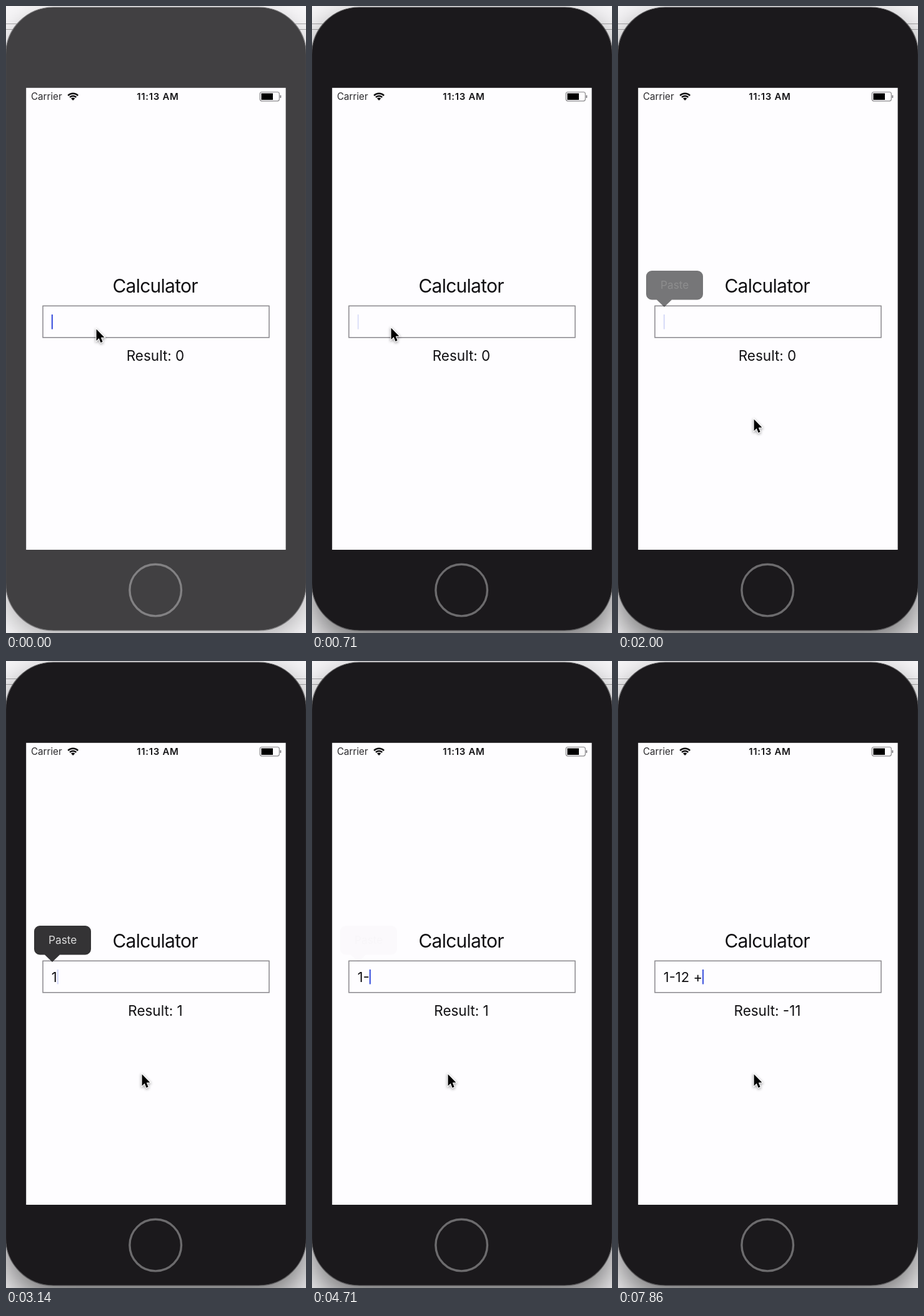
Write an HTML page with a canvas that moves like this. It is 480 by 1002 pixels and loops after 8 s.

```html
<!DOCTYPE html>
<html lang="en">
<head>
<meta charset="utf-8">
<title>Calculator</title>
<style>
html, body { margin: 0; width: 100%; height: 100%; overflow: hidden; background: #f6f5f7; }
canvas { display: block; width: 100vw; height: 100vh; }
</style>
</head>
<body>
<canvas id="stage" width="480" height="1002"></canvas>
<script>
const ctx = document.getElementById('stage').getContext('2d');
const LOOP = 8000, STEP = 1000 / 7;
const FONT = 'Inter, "Liberation Sans", sans-serif';
const FOCUS = 700, TAP = 1800, MENU_OUT = 3857;

const KEYS = [
  { time: 2420, key: '1' },
  { time: 3850, key: '-' },
  { time: 5200, key: '1' },
  { time: 5500, key: '2' },
  { time: 6990, key: ' ' },
  { time: 7790, key: '+' },
];

const clamp = v => Math.min(1, Math.max(0, v));
const progress = (t, from, to) => clamp((t - from) / (to - from));
const smooth = p => p * p * (3 - 2 * p);
const mix = (a, b, p) => a + (b - a) * p;

// Adds up the complete numbers; a trailing operator has no effect.
const evaluate = input => (input.match(/-?\d+/g) || []).reduce((sum, n) => sum + Number(n), 0);

// Blinks once a second, fully on right after a key or tap.
const blink = age => clamp(.12 + 1.3 * Math.cos(2 * Math.PI * (age / 1000 + .04)));

function text(str, x, y, size, { align = 'center', color = '#111013', weight = 400, spacing = 0 } = {}) {
  ctx.font = `${weight} ${size}px ${FONT}`;
  ctx.letterSpacing = spacing + 'px';
  ctx.textAlign = align;
  ctx.fillStyle = color;
  ctx.fillText(str, x, y);
}

function rounded(x, y, w, h, r) {
  ctx.beginPath();
  ctx.roundRect(x, y, w, h, r);
}

function circle(x, y, r, from = 0, to = 2 * Math.PI) {
  ctx.beginPath();
  ctx.arc(x, y, r, from, to);
}

function shadow(color, blur, dy) {
  ctx.shadowColor = color;
  ctx.shadowBlur = blur;
  ctx.shadowOffsetY = dy;
}

function phone(active) {
  ctx.fillStyle = '#f7f6f8';
  ctx.fillRect(0, 0, 480, 1002);
  ctx.fillStyle = '#a9a8aa';
  ctx.fillRect(0, 28, 480, 1);
  ctx.fillRect(0, 37, 480, 1);

  ctx.save();
  if (active) shadow('rgba(0,0,0,.55)', 54, 24);
  else shadow('rgba(0,0,0,.28)', 40, 15);
  ctx.fillStyle = active ? '#1b191c' : '#414042';
  rounded(-.5, 2, 481, 996, 76);
  ctx.fill();
  ctx.restore();
  ctx.strokeStyle = active ? '#5a595b' : '#79787a';
  ctx.lineWidth = 1.2;
  ctx.stroke();

  ctx.fillStyle = '#fefdff';
  ctx.fillRect(32.2, 130.8, 415.4, 738.2);

  ctx.strokeStyle = active ? '#6c6b6d' : '#828183';
  ctx.lineWidth = 3.4;
  circle(239.2, 933.6, 41.3);
  ctx.stroke();
}

function statusBar() {
  text('Carrier', 40, 150, 15.2, { align: 'left', color: '#2a292c' });
  text('11:13 AM', 242.9, 150, 15, { color: '#151417', weight: 600, spacing: .7 });

  const x = 107.2, y = 151, from = -Math.PI * .75, to = -Math.PI * .25;
  ctx.strokeStyle = ctx.fillStyle = '#0c0b0d';
  ctx.lineWidth = 2.5;
  for (const r of [7.3, 11.3]) {
    circle(x, y, r, from, to);
    ctx.stroke();
  }
  circle(x, y, 4.5, from, to);
  ctx.lineTo(x, y);
  ctx.fill();

  ctx.strokeStyle = '#8b8a8d';
  ctx.lineWidth = 1.2;
  rounded(406.3, 137.5, 31, 14.3, 3);
  ctx.stroke();
  ctx.fillStyle = '#000';
  ctx.fillRect(408.5, 139.5, 18.5, 10.5);
  ctx.fillStyle = '#77767a';
  rounded(438.5, 142.5, 1.7, 4.5, 1);
  ctx.fill();
}

function form(t) {
  const pressed = KEYS.filter(k => k.time <= t);
  const input = pressed.map(k => k.key).join('');
  const touched = Math.max(t < TAP ? 0 : TAP, ...pressed.map(k => k.time));

  text('Calculator', 238.6, 458, 30, { spacing: -.75 });
  text('Result: ' + evaluate(input), 239, 567, 22.5);

  ctx.strokeStyle = '#89878c';
  ctx.lineWidth = 1.5;
  ctx.strokeRect(59, 479.3, 362, 50.5);

  text(input, 72.8, 513, 22, { align: 'left' });
  ctx.globalAlpha = blink(t - touched);
  ctx.fillStyle = '#4a5ee0';
  ctx.fillRect(72.7 + ctx.measureText(input).width, 493, 2.3, 23.5);
  ctx.globalAlpha = 1;
}

function menu(t) {
  const alpha = progress(t, 1720, 2140) * Math.exp(-Math.max(0, t - MENU_OUT) / 200);
  ctx.globalAlpha = alpha;
  ctx.fillStyle = '#343335';
  rounded(45, 423, 91, 46.5, 9);
  ctx.moveTo(62, 469.5);
  ctx.lineTo(86, 469.5);
  ctx.lineTo(74, 481);
  ctx.fill();
  const tone = mix(20, 220, alpha);
  text('Paste', 90.7, 452, 17.3, { color: `rgb(${tone},${tone},${tone})` });
  ctx.globalAlpha = 1;
}

function pointer(t) {
  const nudge = smooth(progress(t, 0, 286));
  const away = smooth(progress(t, 1000, 1600));
  ctx.save();
  ctx.translate(mix(mix(144, 126, nudge), 217, away) + .6, mix(mix(515, 513, nudge), 659, away) + 1.5);
  const arrow = new Path2D('M0 0V18.4L4.1 14.5 7 21.4 10 20.1 7.2 13.3 12.8 12.9Z');
  shadow('rgba(0,0,0,.45)', 4, 1.5);
  ctx.strokeStyle = '#fff';
  ctx.lineWidth = 2.2;
  ctx.stroke(arrow);
  shadow('transparent', 0, 0);
  ctx.fillStyle = '#000';
  ctx.fill(arrow);
  ctx.restore();
}

function draw(now) {
  const t = Math.floor((now % LOOP + 5) / STEP) * STEP % LOOP;
  phone(t > FOCUS);
  statusBar();
  form(t);
  menu(t);
  pointer(t);
}

const start = performance.now();
function tick() {
  draw(performance.now() - start);
  requestAnimationFrame(tick);
}
tick();
</script>
</body>
</html>
```
